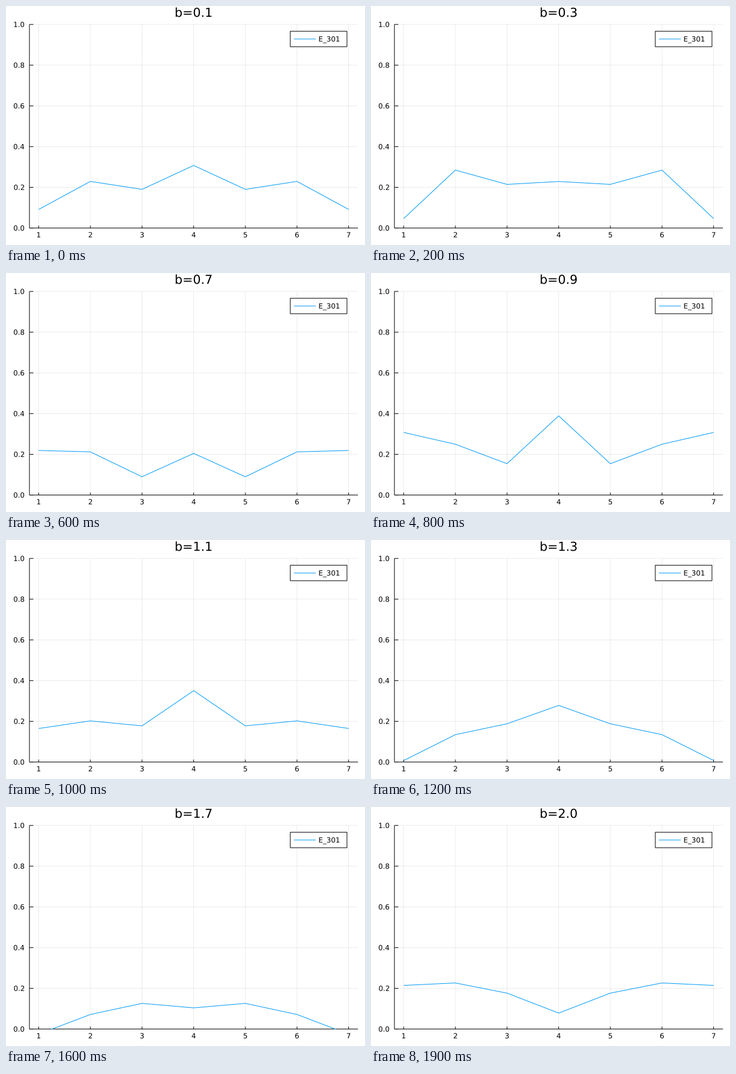
These frames come from a looping animation (600 px wide and 400 px high, 2 s). A matplotlib script:

```python
import numpy as np
import matplotlib.pyplot as plt
from matplotlib.animation import FuncAnimation
from matplotlib.patches import PathPatch, Rectangle
from matplotlib.path import Path
from matplotlib.textpath import TextPath

plt.rcParams["path.snap"] = False

W, H, DPI = 600, 400, 100
LEFT, RIGHT, TOP, BOTTOM = 39.15, 588.19, 30.87, 371.61
X1, STEP = 54.69, 86.327
PX = 72 / DPI
SMALL, LARGE = 11.85, 20.74
BLUE = "#009af9"
FRAMES = 20

# Site energies for sites 1 to 4 at chosen b; sites 5 to 7 mirror them.
KEY_B = np.array([0.1, 0.3, 0.7, 0.9, 1.3, 1.7, 2.0])
KEY_E = np.array([
    [0.0915, 0.2290, 0.1900, 0.3075],
    [0.0467, 0.2845, 0.2145, 0.2285],
    [0.2190, 0.2120, 0.0897, 0.2045],
    [0.3075, 0.2495, 0.1540, 0.3890],
    [0.0075, 0.1345, 0.1880, 0.2780],
    [-0.0250, 0.0715, 0.1260, 0.1040],
    [0.2143, 0.2263, 0.1764, 0.0785],
])


def monotone_slopes(x, y):
    """Slopes for a cubic that does not overshoot its knots."""
    secant = np.diff(y, axis=0) / np.diff(x)[:, None]
    a, b = secant[:-1], secant[1:]
    same = a * b > 0
    inner = np.where(same, 2 * a * b / np.where(same, a + b, 1), 0)
    return np.vstack([secant[:1], inner, secant[-1:]])


SLOPES = monotone_slopes(KEY_B, KEY_E)


def energies(b):
    i = int(np.clip(np.searchsorted(KEY_B, b) - 1, 0, len(KEY_B) - 2))
    h = KEY_B[i + 1] - KEY_B[i]
    t = (b - KEY_B[i]) / h
    half = ((1 + 2 * t) * (1 - t) ** 2 * KEY_E[i]
            + t * (1 - t) ** 2 * h * SLOPES[i]
            + t * t * (3 - 2 * t) * KEY_E[i + 1]
            + t * t * (t - 1) * h * SLOPES[i + 1])
    return np.concatenate([half, half[-2::-1]])


def to_x(site):
    return X1 + (site - 1) * STEP


def to_y(value):
    return BOTTOM - value * (BOTTOM - TOP)


def glyphs(s, x, y, size, align="left"):
    """Outline of s with its ink aligned to x and its baseline at y."""
    path = TextPath((0, 0), s, size=size, prop={"family": "DejaVu Sans"})
    box = path.get_extents()
    ink = {"left": box.x0, "center": (box.x0 + box.x1) / 2, "right": box.x1}
    return Path(path.vertices * [1, -1] + [x - ink[align], y], path.codes)


fig = plt.figure(figsize=(W / DPI, H / DPI), dpi=DPI, facecolor="white")
ax = fig.add_axes([0, 0, 1, 1])
ax.set_xlim(0, W)
ax.set_ylim(H, 0)
ax.axis("off")


def line(xs, ys, color="black", width=1, **kw):
    return ax.plot(xs, ys, color=color, lw=width * PX,
                   solid_capstyle="butt", **kw)[0]


def text(*args):
    patch = PathPatch(glyphs(*args), facecolor="black", lw=0, zorder=5)
    return ax.add_patch(patch)


grid = dict(width=0.75, alpha=0.1, zorder=1)
for site in range(1, 8):
    x = to_x(site)
    line([x, x], [TOP, BOTTOM], **grid)
    line([x, x], [BOTTOM, BOTTOM - 4.1], zorder=2)
    text(str(site), x, 387.2, SMALL, "center")

for value in np.arange(6) / 5:
    y = to_y(value)
    line([LEFT, RIGHT], [y, y], **grid)
    line([LEFT, LEFT + 6.6], [y, y], zorder=2)
    text(f"{value:.1f}", 30.3, y + 4.32, SMALL, "right")

line([LEFT, LEFT], [TOP, BOTTOM], zorder=2)
line([LEFT, RIGHT], [BOTTOM, BOTTOM], zorder=2)

sites = np.arange(1, 8)
curve = line(to_x(sites), to_y(energies(0.1)), BLUE, zorder=3)
curve.set_clip_path(Rectangle((LEFT, TOP), RIGHT - LEFT, BOTTOM - TOP,
                              transform=ax.transData))

ax.add_patch(Rectangle((475.1, 42.23), 94.79, 25.92, facecolor="white",
                       edgecolor="black", lw=PX, zorder=4))
line([481.2, 517.8], [55.19, 55.19], BLUE, zorder=5)
text("E_301", 523.4, 59.5, SMALL)

title = text("b=0.1", 283.7, 18.14, LARGE)


def update(frame):
    b = (frame + 1) / 10
    curve.set_ydata(to_y(energies(b)))
    title.set_path(glyphs(f"b={b:.1f}", 283.7, 18.14, LARGE))
    return curve, title


anim = FuncAnimation(fig, update, frames=FRAMES, interval=100,
                     repeat=True, repeat_delay=0, blit=False)
plt.show()
```
